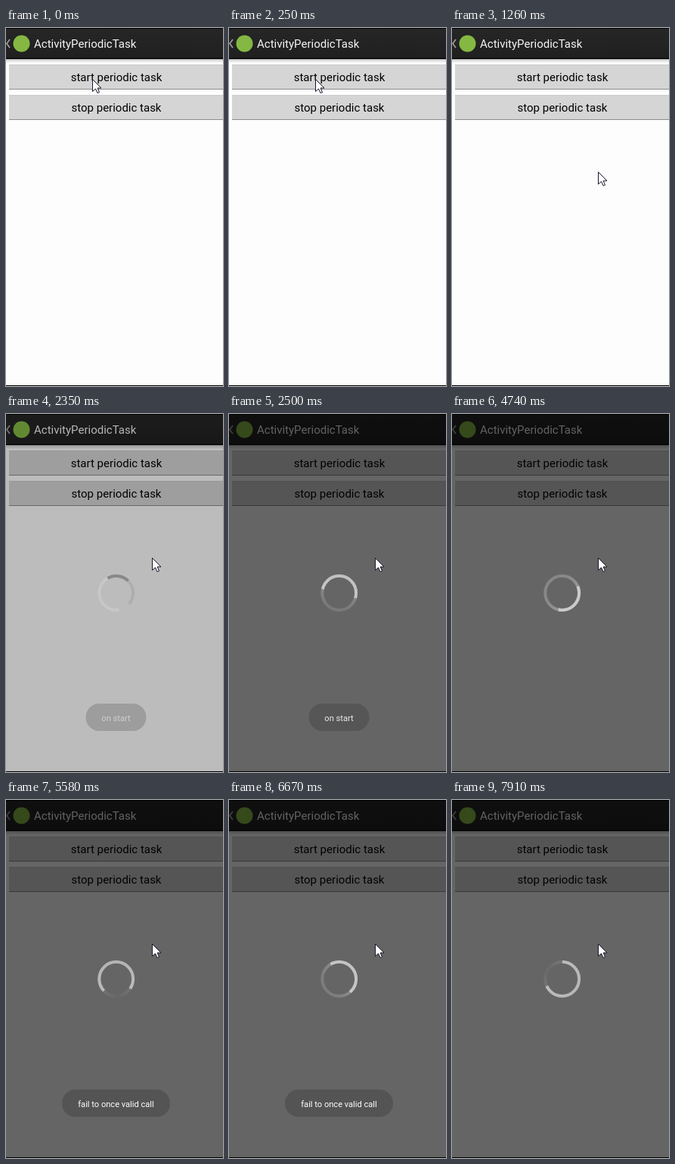
An HTML page with a canvas for the animation above (8000 ms loop, 287 px wide and 471 px high).

```html
<!DOCTYPE html>
<html lang="en">
<head>
<meta charset="utf-8">
<title>Periodic task</title>
<style>
  html, body { margin: 0; width: 100%; height: 100%; overflow: hidden; background: #000; }
  canvas { display: block; width: 287px; height: 471px; }
</style>
</head>
<body>
<canvas id="stage" width="287" height="471"></canvas>
<script>
const W = 287, H = 471, LOOP = 8000;
const ctx = document.getElementById('stage').getContext('2d');
const FONT = 'Roboto, "Noto Sans", sans-serif';
const clamp = (v, lo = 0, hi = 1) => Math.min(hi, Math.max(lo, v));

// Screen refreshes come in runs of eight even steps: [first, last]
const RUNS = [[2350, 3350], [3500, 4470], [4590, 5580], [5730, 6670], [6830, 7760], [7910, 8850]];

// Heads of the two counter-rotating arcs: [time, clockwise, counter-clockwise]
const TURNS = [
  [2350, 45, 330], [3350, 480, 0], [4740, 915, -295],
  [6670, 1580, -750], [7910, 2045, -1080], [8200, 2140, -1150]
];

const POINTER = [[0, 0], [0, 16], [4, 12.5], [6.5, 18], [9, 17], [6.6, 11.5], [11.5, 11.5]];

function rect(x, y, w, h, fill) {
  ctx.fillStyle = fill;
  ctx.fillRect(x, y, w, h);
}

function label(text, x, y, size, color, align = 'center') {
  ctx.font = `${size}px ${FONT}`;
  ctx.textAlign = align;
  ctx.fillStyle = color;
  ctx.fillText(text, x, y);
}

function fade(y, h, from, to) {
  const g = ctx.createLinearGradient(0, y, 0, y + h);
  g.addColorStop(0, from);
  g.addColorStop(1, to);
  rect(0, y, W, h, g);
}

function snap(t) {
  const run = RUNS.filter(r => r[0] <= t).pop();
  if (!run) return t;
  const step = (run[1] - run[0]) / 7;
  return run[0] + step * clamp(Math.floor((t - run[0]) / step + 0.01), 0, 7);
}

function button(text, y, pressed) {
  rect(4, y, W - 4, 32, pressed ? '#8fcfe8' : '#d5d5d5');
  rect(4, y, W - 4, 1, pressed ? '#84c4de' : '#cbcbcb');
  rect(4, y + 32, W - 4, 1, '#8e8e8e');
  label(text, 146, y + 22, 15, '#000');
}

function page(t) {
  rect(0, 0, W, H, '#fdfdfd');
  fade(41, 5, '#c9c9c9', '#fdfdfd');
  fade(0, 39, '#262626', '#202020');
  rect(0, 39, W, 2, '#121212');
  rect(0, 0, W, 1, '#000');

  ctx.strokeStyle = '#a0a0a0';
  ctx.lineWidth = 1.7;
  ctx.beginPath();
  ctx.moveTo(5, 15);
  ctx.lineTo(1, 20.5);
  ctx.lineTo(5, 26);
  ctx.stroke();

  ctx.fillStyle = '#84b843';
  ctx.beginPath();
  ctx.arc(20.5, 20.5, 11, 0, 7);
  ctx.fill();

  label('ActivityPeriodicTask', 37, 26, 15, '#f5f5f5', 'left');
  button('start periodic task', 48, t >= 120 && t < 250);
  button('stop periodic task', 88, false);
  rect(0, H - 1, W, 1, '#000');
}

function ring(style, from = 0, to = 360) {
  const rad = d => (d - 90) * Math.PI / 180;
  ctx.strokeStyle = style;
  ctx.lineWidth = 4;
  ctx.beginPath();
  ctx.arc(145.7, 235.5, 22.4, rad(from), rad(to));
  ctx.stroke();
}

function comet(head, clockwise) {
  const g = ctx.createConicGradient((head - 90) * Math.PI / 180, 145.7, 235.5);
  const bright = 'rgba(255,255,255,.52)', clear = 'rgba(255,255,255,0)';
  g.addColorStop(0, clockwise ? clear : bright);
  g.addColorStop(clockwise ? 0.13 : 0.87, clear);
  g.addColorStop(1, clockwise ? bright : clear);
  ring(g);
}

function spinner(t) {
  if (t < 2480) {
    ring('rgba(255,255,255,.16)', 170, 330);
    ring('rgba(0,0,0,.07)', 45, 130);
    ring('#888', -30, 45);
    return;
  }
  const i = TURNS.findIndex(k => k[0] > t);
  const a = TURNS[i - 1], b = TURNS[i];
  const f = (t - a[0]) / (b[0] - a[0]);
  comet(a[1] + (b[1] - a[1]) * f, true);
  comet(a[2] + (b[2] - a[2]) * f, false);
}

function toast(t, text, width, show, hide) {
  const fadeIn = clamp((t - show) / 400), fadeOut = clamp((t - hide) / 400);
  const alpha = (1 - (1 - fadeIn) ** 2) * (1 - fadeOut ** 2);
  if (alpha <= 0) return;
  ctx.globalAlpha = alpha;
  ctx.fillStyle = 'rgba(68,68,68,.5)';
  ctx.beginPath();
  ctx.roundRect(145.5 - width / 2, 381, width, 36, 18);
  ctx.fill();
  label(text, 145.5, 403.5, 11.1, '#fff');
  ctx.globalAlpha = 1;
}

function pointer(t) {
  const share = t < 830 ? 0 : t < 970 ? 0.25 : t < 1120 ? 0.6 : t < 1260 ? 0.9 : 1;
  ctx.save();
  ctx.translate(114.5 + 79 * share, 67.5 + 122 * share);
  ctx.beginPath();
  POINTER.forEach(p => ctx.lineTo(...p));
  ctx.closePath();
  ctx.fillStyle = '#fff';
  ctx.fill();
  ctx.strokeStyle = '#15152a';
  ctx.lineWidth = 1;
  ctx.stroke();
  ctx.restore();
}

function draw(now) {
  const t = snap(now);
  page(t);
  if (t >= 2350) {
    rect(0, 0, W, H, `rgba(0,0,0,${0.6 * clamp((t - 2255) / 220)})`);
    spinner(t);
    toast(t, 'on start', 80, 2230, 4150);
    toast(t, 'fail to once valid call', 143, 4950, 7000);
  }
  pointer(t);
}

const start = performance.now();
function tick() {
  draw((performance.now() - start) % LOOP);
  requestAnimationFrame(tick);
}
tick();
</script>
</body>
</html>
```
